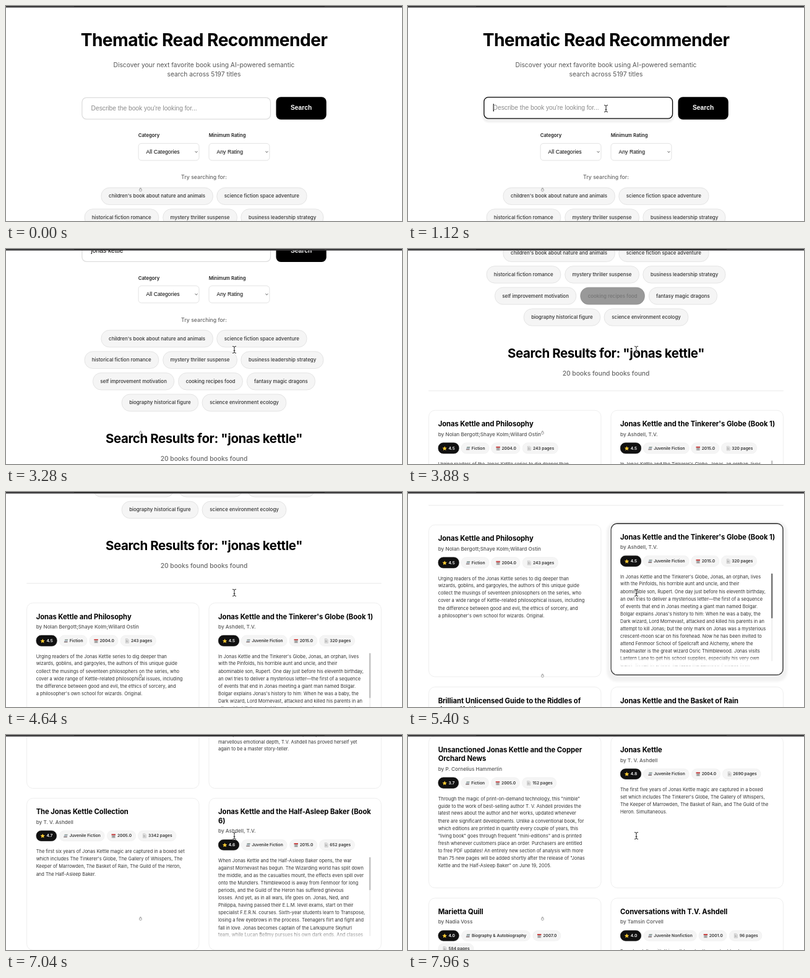
These frames come from a looping animation (640x348 px, 8000 ms). An HTML page:

```html
<!DOCTYPE html>
<html lang="en">
<head>
<meta charset="utf-8">
<title>Book search</title>
<style>
  html, body { margin: 0; width: 100%; height: 100%; overflow: hidden; background: #fff; }
  #stage { position: relative; width: 640px; height: 348px; overflow: hidden; background: #fff; }
  /* The page is laid out 1000 px wide and shown at 64 %. */
  #page { position: absolute; left: 0; top: 0; width: 1000px; height: 3000px; transform-origin: 0 0;
    font-family: Inter, sans-serif; color: #000; }
  #page * { box-sizing: border-box; }
  #page > * { position: absolute; margin: 0; }
  .center { left: 0; width: 1000px; text-align: center; white-space: pre; }
  h1 { top: 55px; font: 700 44px/60px Inter, sans-serif; letter-spacing: -.02em; }
  .lead { top: 135.6px; font-size: 16px; line-height: 24px; color: #555; }
  .control { font-family: "Liberation Sans", Arial, sans-serif; white-space: pre; }
  #input { left: 191px; top: 230.5px; width: 478px; height: 56px; padding-left: 22px; border: 2px solid;
    border-radius: 12px; background: #fff; font-size: 16px; line-height: 52px; }
  #caret { display: inline-block; width: 1.5px; height: 19px; background: #000; vertical-align: -4px; margin-right: -1.5px; }
  #search { left: 682px; top: 230px; width: 127px; height: 56.5px; border-radius: 12px; color: #fff;
    font-size: 16px; font-weight: 700; line-height: 56px; text-align: center; }
  .label { top: 318px; font-size: 12px; font-weight: 600; line-height: 20px; color: #222; }
  .select { top: 347px; width: 154px; height: 44px; padding-left: 19px; border: 1px solid #d4d4d4;
    border-radius: 8px; font-size: 13.6px; line-height: 42px; }
  .select::after { content: ""; position: absolute; right: 4px; top: 17px; width: 4px; height: 4px;
    border: solid #555; border-width: 0 1px 1px 0; transform: rotate(45deg); }
  .try { top: 423px; font-size: 13.6px; font-weight: 500; line-height: 20px; color: #666; }
  .chips { left: 0; width: 1000px; display: flex; justify-content: center; gap: 9.6px; }
  .chip { height: 44px; padding: 0 18.2px; border: 1px solid #d8d8d8; border-radius: 21px; background: #f5f5f5;
    color: #333; font-size: 12.4px; font-weight: 500; line-height: 42px; white-space: pre; }
  h2 { top: 712px; font: 700 32px/44px Inter, sans-serif; letter-spacing: -.02em; }
  .count { top: 774px; font-size: 16px; font-weight: 500; line-height: 21px; color: #666; }
  .rule { left: 52px; top: 828px; width: 896px; height: 1.5px; background: #eee; }
  .card { width: 436px; height: 385px; padding: 23.2px 23px; border: 1px solid #e5e5e5; border-radius: 16px;
    background: #fff; display: flex; flex-direction: column; }
  .card h3 { margin: 0; font: 700 17.6px/22.9px Inter, sans-serif; letter-spacing: -.005em; white-space: pre; }
  .author { margin-top: 4.2px; font-size: 12.8px; font-weight: 500; line-height: 20px; color: #555; white-space: pre; }
  .badges { margin: 11px 0 17px; display: flex; flex-wrap: wrap; gap: 5.8px; }
  .badge { height: 27.3px; padding: 0 9.2px; border: 1px solid #eee; border-radius: 13px; background: #f5f5f5; color: #333;
    display: flex; align-items: center; gap: 3px; font-size: 10.4px; font-weight: 600; line-height: 25px; white-space: pre; }
  .badge:first-child { background: #111; border-color: #111; color: #fff; }
  .badge svg { width: 13px; height: 13px; }
  .text { position: relative; flex: 1; min-height: 0; overflow: hidden; white-space: pre; color: #333;
    font-size: 11.7px; line-height: 18.8px; }
  .long::before { content: ""; position: absolute; left: 0; right: 8px; bottom: 0; height: 19px;
    background: linear-gradient(#fff6, #fff 90%); }
  .bar { position: absolute; right: 3px; top: 0; bottom: 12px; width: 4px; border-radius: 2px; background: #f1f1f1; }
  .thumb { width: 4px; border-radius: 2px; background: #c4c4c4; }
  #overlay { position: absolute; left: 0; top: 0; }
</style>
</head>
<body>
<div id="stage">
  <div id="page">
    <h1 class="center">Thematic Read Recommender</h1>
    <div class="lead center">Discover your next favorite book using AI-powered semantic
search across 5197 titles</div>
    <div id="input" class="control"></div>
    <div id="search" class="control">Search</div>
    <div class="label" style="left:334px">Category</div>
    <div class="label" style="left:512px">Minimum Rating</div>
    <div class="select control" style="left:334px">All Categories</div>
    <div class="select control" style="left:512px">Any Rating</div>
    <div class="try center">Try searching for:</div>
    <h2 class="center">Search Results for: "jonas kettle"</h2>
    <div class="count center">20 books found books found</div>
    <div class="rule"></div>
  </div>
  <svg id="overlay" width="640" height="348">
    <path d="M0 0H640V2.5H0Z" fill="#3c3b3d"/>
    <path d="M110 0H515V1H110Z" fill="#222"/>
    <path d="M216.6 294.8h1.6v2h1v1.8l-.8 1.2h-2l-.8-1.2v-1.8h1z" fill="#fff" stroke="#666" stroke-width=".6"/>
    <g id="beam" fill="none">
      <path id="beamShape" d="M-3-5.5Q0-5.5 0-4Q0-5.5 3-5.5M0-4V4M-3 5.5Q0 5.5 0 4Q0 5.5 3 5.5M-1.3 1.5H1.3" stroke="#fff" stroke-width="2"/>
      <path d="M-3-5.5Q0-5.5 0-4Q0-5.5 3-5.5M0-4V4M-3 5.5Q0 5.5 0 4Q0 5.5 3 5.5M-1.3 1.5H1.3" stroke="#222"/>
    </g>
    <path id="hand" d="M-2.5-4.2q0-1.2 1-1.2t1 1.2v2.6l3.5.8q1.2.4 1 1.7l-.6 2.7v1.8h-4.6v-1.2l-2.6-3.2q-.5-1.2.6-1.2l.7.6z" fill="#222" stroke="#fff" stroke-width=".9"/>
  </svg>
</div>
<script>
const LOOP = 8000, STEP = 40, SCALE = 0.64, QUERY = "jonas kettle";
const $ = id => document.getElementById(id);
const page = $("page");

const icons = {
  star: '<path d="M6.5 1l1.7 3.7 4 .4-3 2.7.9 4-3.6-2.1-3.6 2.1.9-4-3-2.7 4-.4z" fill="#fc3"/>',
  books: '<path d="M4 2.5h8l-1 2.5H3z" fill="#8a9a92"/><path d="M3 5.5h8v2H2z" fill="#9ab"/><path d="M2 8h8.5v2.5H1.5z" fill="#877"/>',
  date: '<path d="M1.5 2h10v10h-10z" fill="#ccc"/><path d="M1.5 2h10v3h-10z" fill="#c44"/><path d="M3 6.5h7M3 8.5h7M3 10.5h7" stroke="#777"/>',
  sheet: '<path d="M3 1h5l3 3v8H3z" fill="#e4e4e4" stroke="#aaa" stroke-width=".7"/><path d="M4 5h4M4 7h5M4 9h5" stroke="#888" stroke-width=".8"/>'
};

const chipRows = [
  ["children's book about nature and animals", "science fiction space adventure"],
  ["historical fiction romance", "mystery thriller suspense", "business leadership strategy"],
  ["self improvement motivation", "cooking recipes food", "fantasy magic dragons"],
  ["biography historical figure", "science environment ecology"]
];

// title, author, rating, genre, year, pages, text, scrollbar thumb length
const books = [
["Jonas Kettle and Philosophy", "Nolan Bergott;Shaye Kolm;Willard Ostin", "4.5", "Fiction", "2004.0", 243,
`Urging readers of the Jonas Kettle series to dig deeper than
wizards, goblins, and gargoyles, the authors of this unique guide
collect the musings of seventeen philosophers on the series, who
cover a wide range of Kettle-related philosophical issues, including
the difference between good and evil, the ethics of sorcery, and
a philosopher's own school for wizards. Original.`],
["Jonas Kettle and the Tinkerer's Globe (Book 1)", "Ashdell, T.V.", "4.5", "Juvenile Fiction", "2015.0", 320,
`In Jonas Kettle and the Tinkerer's Globe, Jonas, an orphan, lives
with the Pinfolds, his horrible aunt and uncle, and their
abominable son, Rupert. One day just before his eleventh birthday,
an owl tries to deliver a mysterious letter—the first of a sequence
of events that end in Jonas meeting a giant man named Bolgar.
Bolgar explains Jonas's history to him: When he was a baby, the
Dark wizard, Lord Mornevast, attacked and killed his parents in an
attempt to kill Jonas; but the only mark on Jonas was a mysterious
crescent-moon scar on his forehead. Now he has been invited to
attend Fenmoor School of Spellcraft and Alchemy, where the
headmaster is the great wizard Osric Thimblewood. Jonas visits
Lantern Lane to get his school supplies, especially his very own
wand. To get to school, he takes the Fenmoor Express from`, 114],
["Brilliant Unlicensed Guide to the Riddles of\nJonas Kettle", "Marigolde Fennet;Orsel Tavindrale", "4.0", "Literary Criticism", "2003.0", 412,
`A guide to T.V. Ashdell's first four Jonas Kettle novels analyzes
mysterious elements, themes, and puzzles hidden throughout the
works and speculates about the plots and endings of future
volumes.`],
["Jonas Kettle and the Basket of Rain", "T. V. Ashdell", "4.5", "Juvenile Fiction", "2000.0", 636,
`The summer holidays are dragging on and Jonas Kettle can't wait
for the start of the school year. It is his fourth year at Fenmoor
School of Spellcraft and Alchemy and there are spells to be learnt
and (unluckily) Potions and Augury lessons to be attended. But
Jonas can't know that the atmosphere is darkening around him, and
his worst enemy is preparing a fate that it seems will be
inescapable . . . With characteristic wit, fast-paced humour and
marvellous emotional depth, T.V. Ashdell has proved herself yet
again to be a master story-teller.`],
["The Jonas Kettle Collection", "T. V. Ashdell", "4.7", "Juvenile Fiction", "2005.0", 3342,
`The first six years of Jonas Kettle magic are captured in a boxed set
which includes The Tinkerer's Globe, The Gallery of Whispers, The
Keeper of Marrowden, The Basket of Rain, The Guild of the Heron,
and The Half-Asleep Baker.`],
["Jonas Kettle and the Half-Asleep Baker (Book\n6)", "Ashdell, T.V.", "4.6", "Juvenile Fiction", "2015.0", 652,
`When Jonas Kettle and the Half-Asleep Baker opens, the war
against Mornevast has begun. The Wizarding world has split down
the middle, and as the casualties mount, the effects even spill over
onto the Mundlers. Thimblewood is away from Fenmoor for long
periods, and the Guild of the Heron has suffered grievous
losses. And yet, as in all wars, life goes on. Jonas, Ned, and
Philippa, having passed their E.L.M. level exams, start on their
specialist F.E.R.N. courses. Sixth-year students learn to Transpose,
losing a few eyebrows in the process. Teenagers flirt and fight and
fall in love. Jonas becomes captain of the Larkspurre Skyhurl
team, while Lucan Bellmy pursues his own dark ends. And classes
are as fascinating and confounding as ever, as Jonas receives`, 84],
["Unsanctioned Jonas Kettle and the Copper\nOrchard News", "P. Cornelius Hammerlin", "3.7", "Fiction", "2005.0", 152,
`Through the magic of print-on-demand technology, this "nimble"
guide to the work of best-selling author T. V. Ashdell provides the
latest news about the author and her works, updated whenever
there are significant developments. Unlike a conventional book, for
which editions are printed in quantity every couple of years, this
"living book" goes through frequent "mini-editions" and is printed
fresh whenever customers place an order. Purchasers are entitled
to free PDF updates! An entirely new section of analysis with more
than 75 new pages will be added shortly after the release of "Jonas
Kettle and the Half-Asleep Baker" on June 19, 2005.`],
["Jonas Kettle", "T. V. Ashdell", "4.8", "Juvenile Fiction", "2004.0", 2690,
`The first five years of Jonas Kettle magic are captured in a boxed
set which includes The Tinkerer's Globe, The Gallery of Whispers,
The Keeper of Marrowden, The Basket of Rain, and The Guild of the
Heron. Simultaneous.`],
["Marietta Quill", "Nadia Voss", "4.0", "Biography & Autobiography", "2007.0", 584, ""],
["Conversations with T.V. Ashdell", "Tamsin Corvell", "4.0", "Juvenile Nonfiction", "2001.0", 96,
`Based on talks with this well-loved author, a short book explores`]
];

const badge = (icon, label) =>
  `<span class="badge"><svg viewBox="0 0 13 13">${icons[icon]}</svg>${label}</span>`;

function add(className, top, left, html) {
  const el = document.createElement("div");
  el.className = className;
  el.style.top = top + "px";
  el.style.left = left + "px";
  el.innerHTML = html;
  page.append(el);
  return el;
}

chipRows.forEach((row, i) => add("chips", 459.4 + 53.7 * i, 0,
  row.map(label => `<span class="chip">${label}</span>`).join("")));

const cards = books.map(([title, author, rating, genre, year, pages, text, thumb], i) =>
  add("card", 878.1 + 409.4 * (i >> 1), i % 2 ? 512 : 52, `<h3>${title}</h3>
    <div class="author">by ${author}</div>
    <div class="badges">${badge("star", rating)}${badge("books", genre)}${badge("date", year)}${badge("sheet", pages + " pages")}</div>
    <div class="text ${thumb ? "long" : ""}">${text}${thumb ? `<div class="bar"><div class="thumb" style="height:${thumb}px"></div></div>` : ""}</div>`));

const chips = document.querySelectorAll(".chip");
const hoverCard = cards[1], hoverThumb = hoverCard.querySelector(".thumb");

// [time, value] knots, linear in between
const scrollKnots = [[2520, 0], [2760, 18], [3360, 185], [3880, 301], [4080, 322], [4200, 322], [4480, 375],
  [4600, 375], [5160, 482], [5400, 509], [5560, 520], [5760, 520], [5960, 690], [6080, 690], [6120, 723],
  [6400, 860], [6720, 950], [6920, 950], [7040, 984], [7320, 1130], [7480, 1130], [7720, 1300], [7880, 1300], [7960, 1346.5]];
const mouseX = [[280, 217], [800, 300], [1080, 320], [2240, 320], [2440, 453], [2560, 453], [2880, 369]];
const mouseY = [[280, 298], [800, 168], [1080, 166], [2240, 166], [2440, 175], [2560, 175], [2880, 163]];

const mix = (a, b, k) => a + (b - a) * k;
const gray = (a, b, k) => { const v = Math.round(mix(a, b, k)); return `rgb(${v},${v},${v})`; };

function at(knots, t) {
  const i = knots.findIndex(k => k[0] > t);
  if (i === 0) return knots[0][1];
  if (i < 0) return knots[knots.length - 1][1];
  const [t0, a] = knots[i - 1], [t1, b] = knots[i];
  return mix(a, b, (t - t0) / (t1 - t0));
}

function ramp(t, from, to) {
  const k = Math.min(1, Math.max(0, (t - from) / (to - from)));
  return k * k * (3 - 2 * k);
}
const pulse = (t, a, b, c, d) => ramp(t, a, b) - ramp(t, c, d);

function paintChip(chip, k) {
  chip.style.background = gray(245, 0, k);
  chip.style.borderColor = gray(216, 0, k);
  chip.style.color = gray(51, 230, k);
}

function render(t) {
  page.style.transform = `scale(${SCALE}) translateY(${-at(scrollKnots, t) / SCALE}px)`;

  const focus = pulse(t, 840, 1120, 2560, 2760), input = $("input").style;
  input.borderColor = gray(221, 0, focus);
  input.transform = `translateY(${-1.5 * focus}px)`;
  input.boxShadow = `0 6px 4px 3px rgba(0,0,0,${0.06 * focus})`;
  const typed = t < 1720 ? 0 : Math.min(QUERY.length, Math.floor((t - 1720) / 44) + 1);
  const caret = t >= 880 && t < 1360 ? '<i id="caret"></i>' : "";
  $("input").style.color = typed ? "#000" : "#8a8a8a";
  $("input").innerHTML = caret + (typed ? QUERY.slice(0, typed) : "Describe the book you're looking for...");

  const press = pulse(t, 2320, 2480, 2640, 2800), button = $("search").style;
  button.background = gray(0, 28, press);
  button.transform = `translateY(${-press}px)`;

  paintChip(chips[0], 0.8 * pulse(t, 240, 440, 440, 640));
  paintChip(chips[6], pulse(t, 3460, 3660, 3740, 3980));

  const lift = pulse(t, 4800, 5100, 6120, 6400), card = hoverCard.style;
  card.borderColor = gray(229, 0, lift);
  card.boxShadow = `0 6px 6px 10px rgba(0,0,0,${0.055 * lift}), inset 0 0 0 1px rgba(0,0,0,${lift})`;
  card.transform = `translateY(${-4 * lift}px)`;
  hoverThumb.style.background = gray(196, 120, lift);

  const x = at(mouseX, t), y = at(mouseY, t);
  const visible = t >= 280 && !(t >= 1720 && t < 2240);
  const onHand = t < 440 || (x > 436 && t < 2700);
  for (const [id, shown] of [["hand", onHand], ["beam", !onHand]]) {
    $(id).setAttribute("transform", `translate(${x} ${y})`);
    $(id).setAttribute("visibility", visible && shown ? "visible" : "hidden");
  }
}

const start = performance.now();
function frame() {
  const t = (performance.now() - start) % LOOP;
  render(Math.floor(t / STEP) * STEP);
  requestAnimationFrame(frame);
}
frame();
</script>
</body>
</html>
```
